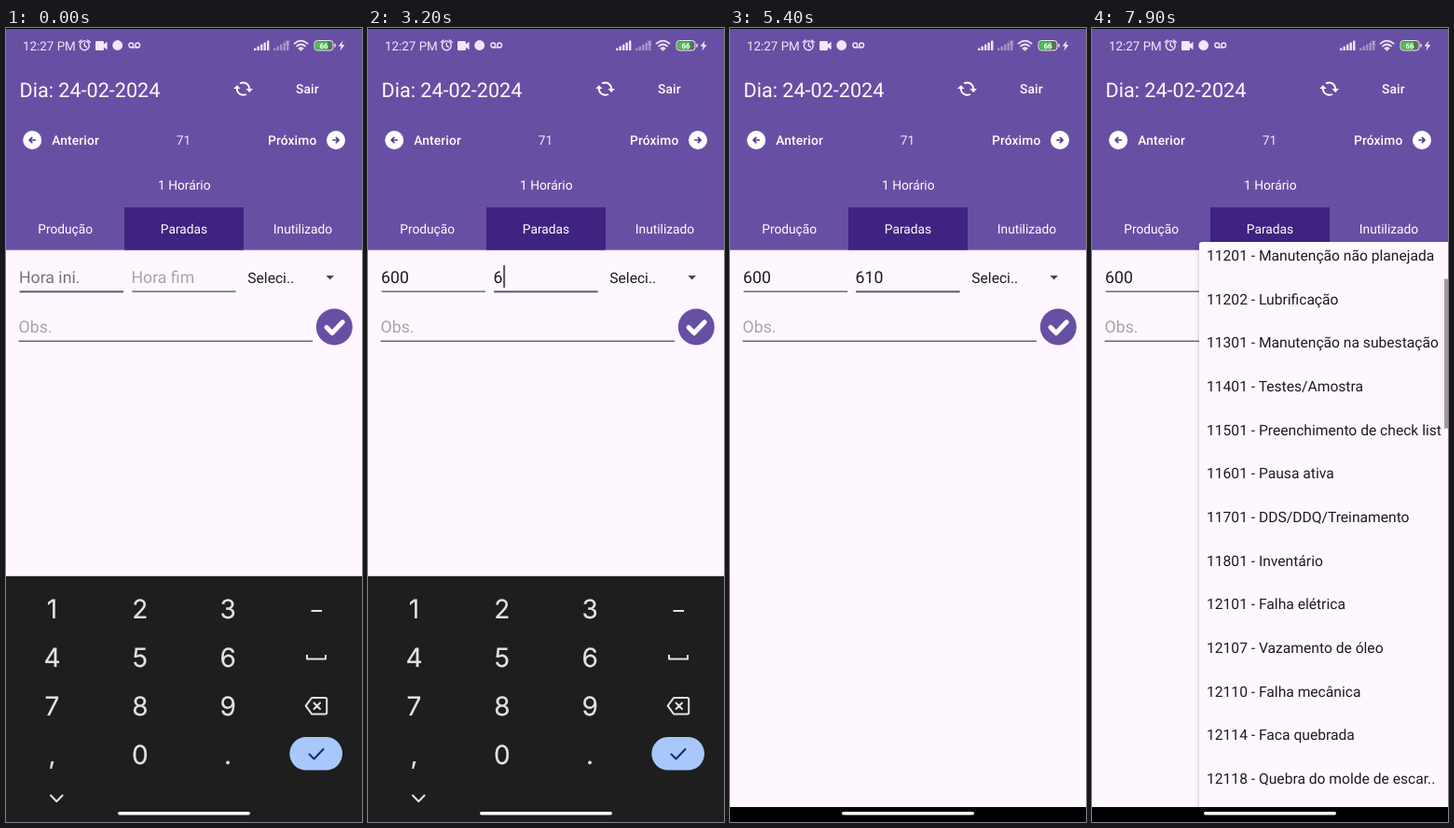
An HTML page that plays this animation: 382 by 850 pixels, repeating every 8000 ms.

```html
<!DOCTYPE html>
<html lang="pt">
<head>
<meta charset="utf-8">
<style>
html, body { margin: 0; width: 100%; height: 100%; overflow: hidden; background: #fef7ff; }
svg { display: block; width: 382px; height: 850px; font-family: Roboto, sans-serif; text-rendering: geometricPrecision; }
.label { font-size: 13.75px; fill: #fff; text-anchor: middle; }
.button { font-size: 13.75px; font-weight: 500; letter-spacing: .15px; fill: #fff; }
.field { font-size: 17.7px; fill: #1d1b20; }
.item { font-size: 15.64px; fill: #1d1b20; }
.key { font: 28px Inter, sans-serif; fill: #e3e3e3; stroke: #e3e3e3; stroke-width: .2; text-anchor: middle; }
.line { fill: none; stroke-linecap: round; stroke-linejoin: round; }
#popup { filter: drop-shadow(0 2px 2px rgba(0, 0, 0, .26)); }
</style>
</head>
<body>
<svg viewBox="0 0 382 850">
  <defs>
    <clipPath id="screen"><rect width="382" height="834"/></clipPath>
    <clipPath id="sheet"><rect x="115" y="229" width="267" height="605"/></clipPath>
  </defs>
  <rect width="382" height="850" fill="#fef7ff"/>
  <rect width="382" height="237.7" fill="#6750a4"/>
  <rect width="382" height="1" fill="#000"/>
  <rect x="127" y="192" width="128" height="45.7" fill="#3f2380"/>

  <g id="status" fill="#eee8f8">
    <text x="18" y="23.7" font-size="13.4">12:27 PM</text>
    <g class="line" stroke="#eee8f8" stroke-width="1.4">
      <circle cx="84.3" cy="18.8" r="4.9"/>
      <path d="M84.3 16v3l2 1.4M78.3 15.2l2.6-2.3M90.3 15.2l-2.6-2.3"/>
      <circle cx="134.3" cy="18.4" r="2.4"/><circle cx="141.2" cy="18.4" r="2.4"/>
      <path d="M134.3 20.9h6.9"/>
    </g>
    <path d="M96 15.2q0-1.2 1.2-1.2h6.6q1.2 0 1.2 1.2v2l3.6-2.4v8.4l-3.6-2.4v2q0 1.2-1.2 1.2h-6.6q-1.2 0-1.2-1.2z"/>
    <circle cx="119.7" cy="18.5" r="5.4"/>
    <g id="signals"></g>
    <path class="line" d="M300 14l4 4m0-4l-4 4" stroke="#b9abd6" stroke-width="1"/>
    <path class="line" d="M309.5 16.6q7-6 14 0M312 19.4q4.5-3.8 9 0M314.4 22q2.1-1.7 4.2 0" stroke="#eee8f8" stroke-width="1.8"/>
    <circle cx="316.5" cy="23.3" r="1.2"/>
    <rect x="331" y="13.5" width="20" height="10.5" rx="3.2" fill="#5d6f5e" stroke="#eee8f8"/>
    <rect x="332.3" y="14.8" width="13" height="7.9" rx="2" fill="#4fc24f"/>
    <rect x="352.3" y="16.8" width="1.4" height="4" rx=".7"/>
    <text x="341" y="21.8" font-size="8" font-weight="700" fill="#fff" text-anchor="middle">66</text>
    <path d="M361.6 13.5l-5 6h3l-1.2 5 5-6.4h-3z"/>
  </g>

  <text x="14.6" y="73.8" font-size="21.6" fill="#fff">Dia: 24-02-2024</text>
  <path transform="translate(265.9 53.7) scale(-.95 .95)" fill="#fff" d="M19 8l-4 4h3c0 3.3-2.7 6-6 6-1 0-2-.3-2.8-.7l-1.5 1.5C9 19.5 10.4 20 12 20c4.4 0 8-3.6 8-8h3zM6 12c0-3.3 2.7-6 6-6 1 0 2 .3 2.8.7l1.5-1.5C15 4.5 13.6 4 12 4c-4.4 0-8 3.6-8 8H1l4 4 4-4z"/>
  <text class="button" x="311" y="70.2">Sair</text>
  <text class="button" x="49.3" y="125.2">Anterior</text>
  <text class="button" x="281" y="125.2">Próximo</text>
  <circle cx="28.2" cy="120" r="10" fill="#fff"/>
  <circle cx="354" cy="120" r="10" fill="#fff"/>
  <path class="line" d="M31.3 120h-6.2m2.7-2.7l-2.7 2.7 2.7 2.7M350.9 120h6.2m-2.7-2.7l2.7 2.7-2.7 2.7" stroke="#513b8c" stroke-width="1.7"/>
  <text class="label" x="190.5" y="125.2" fill-opacity=".88">71</text>
  <text class="label" x="191.3" y="173.2">1 Horário</text>
  <text class="label" x="63.7" y="220">Produção</text>
  <text class="label" x="191" y="220">Paradas</text>
  <text class="label" x="318.5" y="220">Inutilizado</text>

  <g id="fields"></g>
  <text class="item" x="259.3" y="272.6">Seleci..</text>
  <path d="M343.4 265h8.6l-4.3 4.4z" fill="#49454f"/>
  <text class="field" x="13.6" y="326.4" fill-opacity=".38">Obs.</text>
  <rect x="13.6" y="334.6" width="315.4" height="1.2" fill="#49454f"/>
  <circle cx="352.3" cy="320" r="19.5" fill="#6750a4"/>
  <path class="line" d="M344 320.5l6 6 11.2-11.7" stroke="#fff" stroke-width="5"/>

  <rect y="834" width="382" height="16" fill="#000"/>
  <g id="keyboard">
    <rect y="586.8" width="382" height="264" fill="#1e1e1e"/>
    <rect id="pressed" width="92" height="50" rx="8" fill="#3b3b3d"/>
    <g id="keys"></g>
    <g class="line" stroke="#e3e3e3" stroke-width="2">
      <path d="M327.5 624h11.5M323 671v4.5h20V671" stroke-linecap="butt"/>
      <path d="M328 717h14.5q1.7 0 1.7 1.7v14q0 1.7-1.7 1.7H328l-6.3-8.7zM330.5 722.5l6.5 6.5m0-6.5l-6.5 6.5"/>
      <path id="chevron" d="M48 821.5l6.300 6.500 6.300-6.500"/>
    </g>
    <rect id="enter" x="304.300" y="759" width="56.700" height="35.600" rx="17.800"/>
    <path id="enterIcon" class="line" stroke="#0b2f6b" stroke-width="2"/>
  </g>

  <g clip-path="url(#screen)">
    <g id="popup">
      <rect x="115" y="229" width="275" height="620" rx="3" fill="#fef7ff"/>
      <g clip-path="url(#sheet)"><g id="list"></g></g>
      <rect id="scrollbar" x="378" width="4" height="160" fill="#9f99a2"/>
    </g>
  </g>
  <rect x="120" y="839" width="142" height="3.500" rx="1.750" fill="#fff"/>
</svg>
<script>
const LOOP = 8000, STEP = 100, BLINK = 500;
const ROW = 46.69, VIEW = 605, THUMB = 160, DIGIT = 9.94;
const FOCUS_MOVE = 2500, CURSOR_END = 5100;
const CHECK = 'M325.5 777.5l5 5 10-10.5';
const TAB = 'M323 777h14.5m-5-5l5 5-5 5M342.2 771.5v11';

const $ = id => document.getElementById(id);
const clamp = v => Math.max(0, Math.min(1, v));
const show = (el, on) => el.setAttribute('visibility', on ? 'visible' : 'hidden');

function add(parent, tag, attrs, text = '') {
  const el = document.createElementNS('http://www.w3.org/2000/svg', tag);
  for (const name in attrs) el.setAttribute(name, attrs[name]);
  el.textContent = text;
  return parent.appendChild(el);
}

for (const [x, dim] of [[266, 1], [287, .45]])
  for (let i = 0; i < 5; i++) {
    const height = 2.6 + i * 2;
    add($('signals'), 'rect', { x: x + i * 3.5, y: 24 - height, width: 2.4, height, rx: .6, opacity: dim });
  }

// Keypad cells are 94.3 x 52, centred on these positions.
const keyCentre = {};
['123', '456', '789', ',0.'].forEach((row, r) => [...row].forEach((key, c) => {
  const centre = keyCentre[key] = { x: 49.5 + c * 94.3, y: 621.5 + r * 52 };
  add($('keys'), 'text', { class: 'key', x: centre.x, y: centre.y + 10.2 }, key);
}));

[
  'Selecione o código da parada.',
  '11102 - Troca de programação',
  '11105 - Troca de cepo',
  '11201 - Manutenção não planejada',
  '11202 - Lubrificação',
  '11301 - Manutenção na subestação',
  '11401 - Testes/Amostra',
  '11501 - Preenchimento de check list',
  '11601 - Pausa ativa',
  '11701 - DDS/DDQ/Treinamento',
  '11801 - Inventário',
  '12101 - Falha elétrica',
  '12107 - Vazamento de óleo',
  '12110 - Falha mecânica',
  '12114 - Faca quebrada',
  '12118 - Quebra do molde de escar..'
].forEach((text, i) => add($('list'), 'text', { class: 'item', x: 123, y: 258.7 + i * ROW }, text));

function makeField(x, hint, focus, blur, presses) {
  const group = $('fields');
  return {
    x, hint, focus, blur, presses,
    text: add(group, 'text', { class: 'field', x, y: 273.2 }),
    line: add(group, 'rect', { x: x + .6, width: 111.5 }),
    cursor: add(group, 'rect', { y: 254, width: 2, height: 24, fill: '#5b4f63' })
  };
}

// Each press: key, time down, time up. The digit is entered on release.
const fields = [
  makeField(14, 'Hora ini.', -500, FOCUS_MOVE, [['6', 600, 800], ['0', 1300, 1500], ['0', 1900, 2100]]),
  makeField(134.5, 'Hora fim', FOCUS_MOVE, LOOP, [['6', 3000, 3200], ['1', 3600, 3800], ['0', 4300, 4400]])
];
const allPresses = fields.flatMap(field => field.presses);

function drawField(field, t) {
  const typed = field.presses.filter(press => t >= press[2]);
  const focused = t >= field.focus && t < field.blur;
  const lastEdit = typed.length ? typed.at(-1)[2] : field.focus;
  const blinkOn = Math.floor((t - lastEdit) / BLINK) % 2 === 0;
  field.text.textContent = typed.map(press => press[0]).join('') || field.hint;
  field.text.setAttribute('fill-opacity', typed.length ? 1 : focused ? .6 : .38);
  field.line.setAttribute('y', focused ? 281.3 : 281.5);
  field.line.setAttribute('height', focused ? 2 : 1.2);
  field.line.setAttribute('fill', focused ? '#65566d' : '#49454f');
  field.cursor.setAttribute('x', field.x + typed.length * DIGIT + .7);
  show(field.cursor, focused && blinkOn && t < CURSOR_END);
}

function drawKeyboard(t) {
  const press = allPresses.find(([, down, up]) => t >= down && t < up);
  show($('pressed'), press);
  if (press) {
    const { x, y } = keyCentre[press[0]];
    $('pressed').setAttribute('x', x - 46);
    $('pressed').setAttribute('y', y - 25);
  }
  $('enter').setAttribute('fill', t >= 2300 && t < FOCUS_MOVE ? '#c6dafc' : '#a8c7fa');
  $('enterIcon').setAttribute('d', t >= 200 && t < FOCUS_MOVE ? TAB : CHECK);
  show($('chevron'), t < 5100);
  const hide = clamp((t - 5200) / 200);
  $('keyboard').setAttribute('transform', `translate(0 ${264 * hide * hide})`);
}

function drawPopup(t) {
  const scroll = t > 7200 ? 212 * (1 - Math.exp((7200 - t) / 570)) : 0;
  $('popup').setAttribute('opacity', clamp((t - 5500) / 300));
  $('list').setAttribute('transform', `translate(0 ${-scroll})`);
  $('scrollbar').setAttribute('y', 229 + scroll * THUMB / VIEW);
}

function frame() {
  const t = Math.floor(performance.now() % LOOP / STEP) * STEP;
  fields.forEach(field => drawField(field, t));
  drawKeyboard(t);
  drawPopup(t);
  requestAnimationFrame(frame);
}
frame();
</script>
</body>
</html>
```
